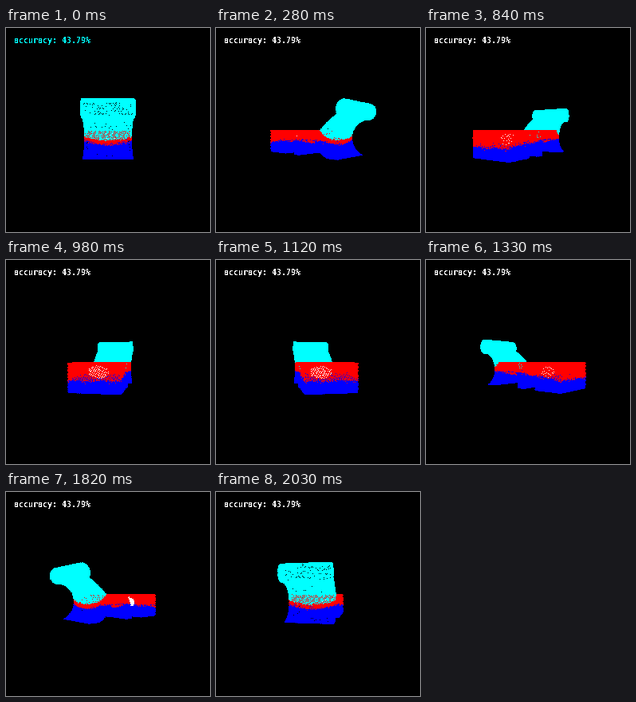
These frames come from a looping animation (256 by 256 pixels, 2100 ms). A matplotlib script:

```python
import numpy as np
import matplotlib.pyplot as plt
from matplotlib.animation import FuncAnimation
from matplotlib.path import Path

SIZE, FRAMES, STEP_MS = 256, 30, 70
EYE = 245                # camera distance from the turning axis
HALF = 25.5              # half width of both pieces
TOP, FLOOR = .8, 29.5    # seat and ground heights, y downwards
NEAR, FAR = -33, -64.5   # stool ends along the chair axis
RED, BLUE, CYAN, WHITE = "red", "blue", "cyan", "white"
RGB = {RED: (255, 0, 0), BLUE: (0, 0, 255), CYAN: (0, 255, 255), WHITE: (255, 255, 255)}
rng = np.random.default_rng(7)


def arc(center, r, start, stop):
    a = np.radians(np.linspace(start, stop, 40))
    return np.array(center) + r * np.column_stack([np.cos(a), np.sin(a)])


def bend(p0, p1, p2):
    t = np.linspace(0, 1, 12)[:, None]
    return (1 - t) ** 2 * np.array(p0) + 2 * t * (1 - t) * np.array(p1) + t * t * np.array(p2)


def spread(n):
    """n evenly scattered points in the unit square."""
    return (rng.random(2) + np.arange(n)[:, None] * (.7548777, .5698403)) % 1


def sheet(a, b, density):
    """Points on the strip that edge a-b sweeps across the width."""
    a, b = np.array(a), np.array(b)
    q = spread(int(np.hypot(*(b - a)) * 2 * HALF * density))
    return np.column_stack([a + q[:, :1] * (b - a), (2 * q[:, 1] - 1) * HALF])


def side(outline, v, density):
    lo, hi = outline.min(axis=0), outline.max(axis=0)
    p = lo + spread(int(np.prod(hi - lo) * density)) * (hi - lo)
    p = p[Path(outline).contains_points(p)]
    return np.column_stack([p, np.full(len(p), v)])


def extrude(outline, density):
    edges = zip(outline, np.roll(outline, -1, axis=0))
    return np.vstack([sheet(a, b, density) for a, b in edges]
                     + [side(outline, v, density) for v in (-HALF, HALF)])


def label_chair(p):
    u, y, v = p.T
    bulge = 1 - (v / HALF) ** 2
    y = y + rng.normal(0, .5, len(y))
    part = np.where(y > 11.7 + 5 * bulge, BLUE, RED)
    return np.where(y < .8 * (u - 26) + 1 + 4 * bulge, CYAN, part)


def label_stool(p):
    u, y, v = p.T
    edge = 14 + 3.5 * ((u - NEAR) / (FAR - NEAR)) ** 2 + .7 * np.sin(v * .3)
    part = np.where(y + rng.normal(0, 1, len(y)) > edge, BLUE, RED)
    patch = (u > NEAR - .01) & (((v - 3.5) / 12) ** 2 + ((y - 11) / 7) ** 2 < 1)
    return np.where(patch, WHITE, part)


chair = extrude(np.vstack([
    bend((25, TOP), (34, -8), (47, -15.5)),         # backrest
    arc((56, -20.8), 9.3, 153, 450),                # head roll
    arc((55, 9.5), 21.2, 270, 109),                 # hollow rear
    bend((35, FLOOR), (22, 24), (18, 11.8)),        # rear foot
    bend((-4, 11.8), (-7.2, 15), (-7.2, FLOOR)),    # front leg
    bend((-16, FLOOR), (-16, 8), (-4, TOP)),
]), 1.6)
box = np.array([(FAR, TOP), (NEAR, TOP), (NEAR, FLOOR), (FAR, FLOOR)])
stool = np.vstack([extrude(box, 1.6), sheet((NEAR, TOP), (NEAR, FLOOR), 1.5)])

U, Y, V = np.vstack([chair, stool]).T
parts = np.concatenate([label_chair(chair), label_stool(stool)])
COLORS = np.array([RGB[p] for p in parts], np.uint8)


def render(angle):
    s, c = np.sin(angle), np.cos(angle)
    depth = U * c - V * s
    scale = EYE / (EYE - depth)
    order = np.argsort(depth)
    col = np.floor(SIZE / 2 + (U * s + V * c) * scale).astype(int)[order]
    row = np.floor(SIZE / 2 + Y * scale).astype(int)[order]
    img = np.zeros((SIZE, SIZE, 3), np.uint8)
    img[row, col] = COLORS[order]
    return img


fig = plt.figure(figsize=(SIZE / 100, SIZE / 100), dpi=100, facecolor="black")
ax = fig.add_axes([0, 0, 1, 1])
ax.axis("off")
view = ax.imshow(render(0), extent=(0, SIZE, SIZE, 0), interpolation="nearest")
label = ax.text(10, 19, "accuracy: 43.79%", family="DejaVu Sans Mono", weight="bold",
                size=7.2, va="baseline", antialiased=False)


def update(i):
    view.set_data(render(2 * np.pi * i / FRAMES))
    label.set_color(CYAN if i == 0 else WHITE)
    return view, label


anim = FuncAnimation(fig, update, frames=FRAMES, interval=STEP_MS,
                     repeat=True, repeat_delay=0)
plt.show()
```
